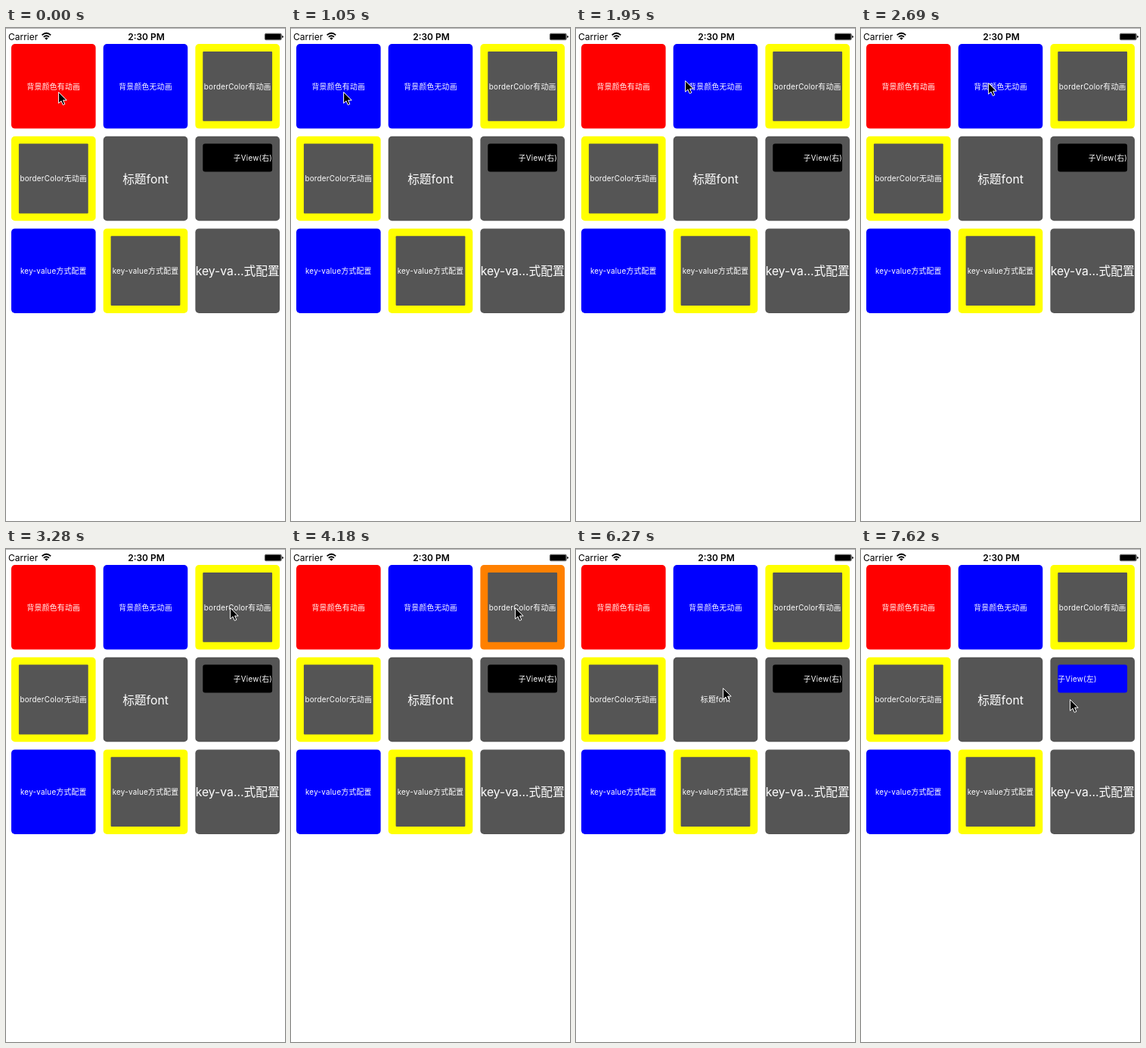
An HTML page for the animation above (8000 ms loop, 369 px wide and 650 px high).

```html
<!DOCTYPE html>
<html lang="zh-CN">
<head>
<meta charset="utf-8">
<title>按钮状态</title>
<style>
  html, body { margin: 0; width: 100%; height: 100%; overflow: hidden; background: #fff; }
  svg { display: block; font-family: Inter, "Noto Sans CJK SC", "Noto Sans CJK", sans-serif; }

  .bar { font-size: 12px; }
  .clock { font-weight: 600; text-anchor: middle; }
  .line { fill: none; stroke: #000; }

  .tile {
    transform: translate(calc(7px + var(--c) * 121.7px), calc(21px + var(--r) * 121.7px));
  }
  .tile rect { width: 111.6px; height: 111.6px; rx: 4.9px; fill: #555; }
  .tile rect.blue { fill: #00f; }
  .tile rect.border { fill: #ff0; }
  .tile rect.inner { x: 9.9px; y: 9.9px; width: 91.8px; height: 91.8px; rx: 1px; }
  .tile rect.sub { x: 9.9px; y: 9.9px; width: 91.8px; height: 37px; rx: 3px; fill: #000; }
  .tile text { fill: #fff; font-size: 9.84px; letter-spacing: .24px; text-anchor: middle; }
  .tile text.big { font-size: 15.74px; letter-spacing: 0; }
  .tile text.right { text-anchor: end; }
  .tile text.left { text-anchor: start; opacity: 0; }

  .fade, .flip, .ring, .ring-flip, .font, .sub, .right, .left, .cursor {
    animation: 8s step-end infinite;
  }
  .fade { animation-name: fade; }
  .flip { animation-name: flip; }
  .ring { animation-name: ring; }
  .ring-flip { animation-name: ring-flip; }
  .font { animation-name: font; }
  .sub { animation-name: sub; }
  .right { animation-name: hide; }
  .left { animation-name: show; }
  .cursor { animation-name: move; }

  @keyframes fade {
    0%, 24.375% { fill: #f00; }
    7.5%, 22.5% { fill: rgb(237, 0, 18); }
    9.375%, 20.625% { fill: rgb(140, 0, 115); }
    11.25%, 18.75% { fill: rgb(31, 0, 224); }
    13.125% { fill: #00f; }
  }
  @keyframes flip {
    0%, 31.75% { fill: #00f; }
    28.125% { fill: #f00; }
  }
  @keyframes ring {
    0%, 54.125% { fill: #ff0; }
    44.75%, 52.25% { fill: #ff8000; }
    46.625% { fill: #f00; }
  }
  @keyframes ring-flip {
    0%, 70.875% { fill: #ff0; }
    63.5% { fill: #f00; }
  }
  @keyframes font {
    0%, 84% { font-size: 15.74px; letter-spacing: 0; }
    78.375% { font-size: 9.84px; letter-spacing: .24px; }
  }
  @keyframes sub { 0% { fill: #000; } 95.25% { fill: #00f; } }
  @keyframes hide { 0% { opacity: 1; } 95.25% { opacity: 0; } }
  @keyframes show { 0% { opacity: 0; } 95.25% { opacity: 1; } }
  @keyframes move {
    0% { transform: translate(69px, 83px); }
    22.5% { transform: translate(92px, 79px); }
    24.375% { transform: translate(144px, 68px); }
    33.625% { transform: translate(168px, 71px); }
    35.5% { transform: translate(214px, 76px); }
    39.25% { transform: translate(262px, 76px); }
    41% { transform: translate(296px, 76px); }
    56% { transform: translate(248px, 100px); }
    57.875% { transform: translate(146px, 149px); }
    59.75% { transform: translate(98px, 170px); }
    72.75% { transform: translate(142px, 176px); }
    74.625% { transform: translate(194px, 182px); }
    91.5% { transform: translate(232px, 189px); }
    93.375% { transform: translate(276px, 197px); }
  }
</style>
</head>
<body>
<svg width="369" height="650">
  <rect width="369" height="1" fill="#b0b0b0"/>
  <text class="bar" x="3" y="16">Carrier</text>
  <text class="bar clock" x="185.5" y="16">2:30 PM</text>
  <g transform="translate(46 5)">
    <path class="line" stroke-width="1.8" d="M1.6 4.4Q7.4-1 13.2 4.4M3.8 6.9Q7.4 3.5 11 6.9"/>
    <path d="M5.2 8.5Q7.4 6.6 9.6 8.5L7.4 10.8Z"/>
  </g>
  <g transform="translate(341 6)">
    <rect class="line" x="1.4" y="1.3" width="21.8" height="8.4" rx="1.6" stroke-width=".7"/>
    <rect x="2" y="1.9" width="20.6" height="7.2" rx=".8"/>
    <path d="M24.2 3.9Q25.9 4.2 25.9 5.5T24.2 7.1Z"/>
  </g>

  <g class="tile" style="--c:0;--r:0">
    <rect class="fade"/>
    <text x="55.8" y="55.8" dy=".39em">背景颜色有动画</text>
  </g>
  <g class="tile" style="--c:1;--r:0">
    <rect class="blue flip"/>
    <text x="55.8" y="55.8" dy=".39em">背景颜色无动画</text>
  </g>
  <g class="tile" style="--c:2;--r:0">
    <rect class="border ring"/><rect class="inner"/>
    <text x="55.8" y="55.8" dy=".39em">borderColor有动画</text>
  </g>
  <g class="tile" style="--c:0;--r:1">
    <rect class="border ring-flip"/><rect class="inner"/>
    <text x="55.8" y="55.8" dy=".39em">borderColor无动画</text>
  </g>
  <g class="tile" style="--c:1;--r:1">
    <rect/>
    <text class="big font" x="55.8" y="55.8" dy=".39em">标题font</text>
  </g>
  <g class="tile" style="--c:2;--r:1">
    <rect/><rect class="sub"/>
    <text class="right" x="101.8" y="28.4" dy=".39em">子View(右)</text>
    <text class="left" x="9.9" y="28.4" dy=".39em">子View(左)</text>
  </g>
  <g class="tile" style="--c:0;--r:2">
    <rect class="blue"/>
    <text x="55.8" y="55.8" dy=".39em">key-value方式配置</text>
  </g>
  <g class="tile" style="--c:1;--r:2">
    <rect class="border"/><rect class="inner"/>
    <text x="55.8" y="55.8" dy=".39em">key-value方式配置</text>
  </g>
  <g class="tile" style="--c:2;--r:2">
    <rect/>
    <text class="big" x="55.8" y="55.8" dy=".39em">key-va…式配置</text>
  </g>

  <path class="cursor" d="M.6 1.6V16.2L4 13.1L6.3 18.4L8.8 17.3L6.6 12.2H11.2Z" stroke="#fff"/>
</svg>
</body>
</html>
```
